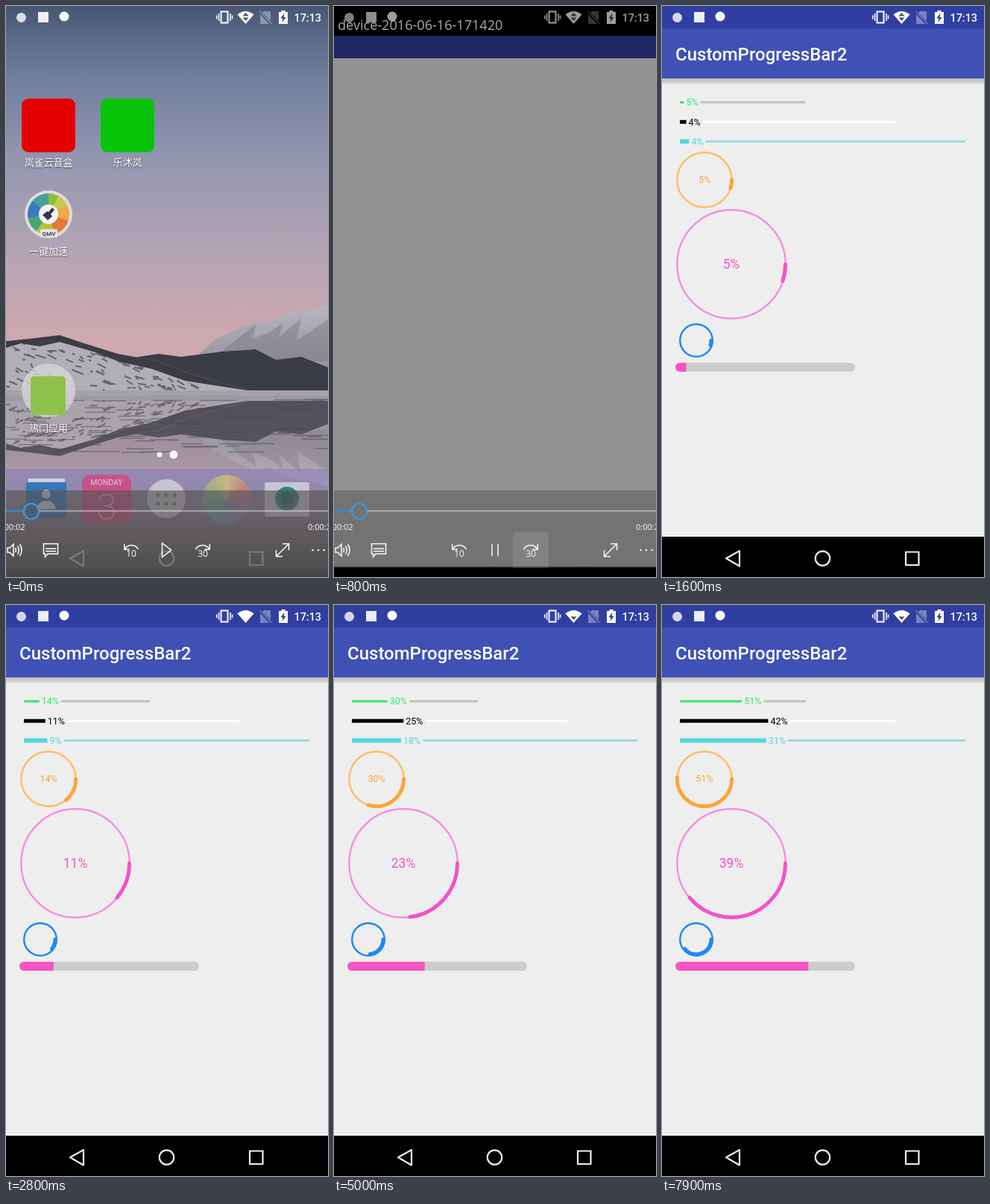
These frames come from a looping animation (432 by 765 pixels, 8000 ms). An HTML page:

```html
<!DOCTYPE html>
<html lang="zh">
<head>
<meta charset="utf-8">
<title>CustomProgressBar2</title>
<style>
html, body { margin: 0; width: 100%; height: 100%; overflow: hidden; background: #000; }
svg { display: block; width: 432px; height: 765px; }
text { font-family: Roboto, sans-serif; }
.label { font: 13px "Noto Sans CJK SC", "Noto Sans CJK", sans-serif; fill: #fff; text-anchor: middle; text-shadow: 0 1px 2px #0009; }
.player text { font-family: "Open Sans", "Noto Sans", sans-serif; fill: #fff; }
.line { fill: none; stroke: #fff; stroke-width: 1.5; }

.fade, .panel, .controls, .play, .pause, .hover, .hover30, #app, #window, #content, #nav, .up, .down {
  animation: 8s step-end infinite;
}
.fade { animation-name: fade; }
.panel { animation-name: panel; }
.controls { animation-name: controls; }
.play { animation-name: play; }
.pause { animation-name: pause; }
.hover { animation-name: hover; }
.hover30 { animation-name: hover30; }
#app { animation-name: app; }
#window { animation-name: slide; }
#content { animation-name: content; }
#nav { animation-name: nav; }
.up { animation-name: up; }
.down { animation-name: down; }

@keyframes fade {
  0% { opacity: 0; animation-timing-function: steps(5); }
  6.25% { opacity: 1; }
  8.75% { opacity: .84; }
  10% { opacity: .67; animation-timing-function: steps(3); }
  13.75% { opacity: .11; }
  15%, 100% { opacity: 0; }
}
@keyframes panel {
  0% { opacity: .62; }
  10% { opacity: .48; animation-timing-function: steps(3); }
  13.75% { opacity: .28; }
  15% { opacity: .1; }
  16.25%, 100% { opacity: 0; }
}
@keyframes controls {
  0% { opacity: 1; }
  10% { opacity: .95; animation-timing-function: steps(3); }
  13.75% { opacity: .3; }
  15% { opacity: .1; }
  16.25%, 100% { opacity: 0; }
}
@keyframes play { 0% { opacity: 1; } 8.75%, 100% { opacity: 0; } }
@keyframes pause { 0% { opacity: 0; } 8.75%, 100% { opacity: 1; } }
@keyframes hover {
  0% { opacity: 0; animation-timing-function: steps(5); }
  6.25% { opacity: 1; }
  8.75%, 100% { opacity: 0; }
}
@keyframes hover30 { 0% { opacity: 0; } 8.75% { opacity: .6; } 12.5%, 100% { opacity: 0; } }
@keyframes app { 0% { opacity: 0; } 10%, 100% { opacity: 1; } }
@keyframes slide {
  0% { transform: translateY(40px); }
  11.25% { transform: translateY(18px); }
  12.5% { transform: translateY(5px); }
  13.75%, 100% { transform: none; }
}
@keyframes content { 0% { opacity: 0; } 15%, 100% { opacity: 1; } }
@keyframes nav {
  0% { opacity: .6; }
  10% { opacity: .2; }
  12.5% { opacity: .5; }
  13.75%, 100% { opacity: .93; }
}
@keyframes up {
  0% { opacity: 1; } 25% { opacity: 0; }
  55% { opacity: 1; } 58.75% { opacity: 0; }
  92.5% { opacity: 1; } 96.25%, 100% { opacity: 0; }
}
@keyframes down {
  0% { opacity: 1; } 25% { opacity: 0; }
  47.5% { opacity: 1; } 70% { opacity: 0; }
  92.5%, 100% { opacity: 1; }
}
.wheel { width: 100%; height: 100%; border-radius: 50%; }
.boost { background: conic-gradient(#8bbf3c 0 8%, #c9c94a 0 18%, #f0a848 0 30%, #e4783c 0 45%, #b8c437 0 60%, #4aa578 0 72%, #3a7cc0 0 86%, #46a098 0); }
.gallery { background: conic-gradient(#d8c07a, #cf7f7a, #a87fae, #6f93c0, #63a9a5, #9db87c, #d8c07a); }
</style>
</head>
<body>
<svg viewBox="0 0 432 765">
<defs>
  <linearGradient id="sky" x2="0" y2="1">
    <stop offset="0" stop-color="#475675"/>
    <stop offset=".16" stop-color="#6d7b9b"/>
    <stop offset=".4" stop-color="#9698b1"/>
    <stop offset=".62" stop-color="#b3a4b3"/>
    <stop offset=".84" stop-color="#cea8af"/>
    <stop offset="1" stop-color="#d3acb0"/>
  </linearGradient>
  <linearGradient id="peak" x2="0" y2="1">
    <stop offset="0" stop-color="#b9b5bf"/>
    <stop offset="1" stop-color="#85838f"/>
  </linearGradient>
  <linearGradient id="lake" x2="0" y2="1">
    <stop offset="0" stop-color="#8f8792"/>
    <stop offset=".4" stop-color="#a998a4"/>
    <stop offset=".52" stop-color="#9a8f9e"/>
    <stop offset=".75" stop-color="#6f6b72"/>
    <stop offset="1" stop-color="#454347"/>
  </linearGradient>
  <linearGradient id="dock" x2="0" y2="1">
    <stop offset="0" stop-color="#8a80c0" stop-opacity=".6"/>
    <stop offset=".3" stop-color="#8a80b0" stop-opacity=".5"/>
    <stop offset="1" stop-color="#555" stop-opacity="0"/>
  </linearGradient>
  <linearGradient id="shade" x2="0" y2="1">
    <stop offset="0" stop-color="#bdbdc0"/>
    <stop offset="1" stop-color="#d9d9d9"/>
  </linearGradient>
  <clipPath id="slope"><path d="M0 455L72 446 120 462 200 484 262 512 300 520H0Z"/></clipPath>
</defs>

<g id="home">
  <rect width="432" height="530" fill="url(#sky)"/>
  <rect y="522" width="432" height="243" fill="url(#lake)"/>
  <g id="hills">
    <path d="M255 470L282 446 315 430 336 422 352 424 388 410 408 408 432 400V522H255Z" fill="url(#peak)"/>
    <path d="M290 462L336 426 330 446 352 438 372 424 366 444 396 418 390 448 432 420V476H290Z" fill="#77757f" opacity=".45"/>
    <path d="M150 474L205 466 235 470 290 463 335 460 362 474 396 470 432 484V518H180Z" fill="#3a3c48"/>
    <path d="M0 449L30 446 72 441 105 452 150 466 205 476 250 494 330 516V522H0Z" fill="#b2aeb5"/>
    <path d="M0 449L30 446 72 441 105 452 150 466 205 476 250 494 330 516 240 502 195 486 150 476 120 464 72 450 45 456 20 452 0 458Z" fill="#3c3b42"/>
    <path id="rocks" clip-path="url(#slope)" fill="none" stroke="#4a484f" stroke-width="2" opacity=".75"/>
    <rect y="515" width="432" height="7" fill="#a5a1ab"/>
  </g>
  <use href="#hills" transform="translate(0 1044) scale(1 -1)" opacity=".72"/>
  <path id="ripples" fill="none" stroke="#4b4852" stroke-width="1.500" opacity=".5"/>

  <rect x="21" y="124" width="72" height="72" rx="9" fill="#e40000"/>
  <rect x="127" y="124" width="72" height="72" rx="9" fill="#08c308"/>
  <text class="label" x="57" y="214">岚雀云音盒</text>
  <text class="label" x="163" y="214">乐沐岚</text>

  <circle cx="57" cy="279" r="32" fill="#dcdde0"/>
  <foreignObject x="29" y="251" width="56" height="56"><div class="wheel boost"></div></foreignObject>
  <circle cx="57" cy="279" r="13" fill="#f4f4f4"/>
  <path d="M62 270L65 273 60 279 62 282 56 287 49 280 55 275 57 276Z" fill="#2d3b50"/>
  <rect x="46" y="299" width="23" height="11" rx="2" fill="#e6e6e6"/>
  <text x="57.500" y="307.500" font-size="8" font-weight="700" text-anchor="middle" fill="#444">QMV</text>
  <text class="label" x="57" y="333">一键加速</text>

  <circle cx="57" cy="515" r="36" fill="#d9d9dc" opacity=".75"/>
  <rect x="33" y="496" width="47" height="52" rx="5" fill="#8fc24c"/>
  <text class="label" x="57" y="570">热门应用</text>
  <circle cx="206" cy="601" r="3.500" fill="#fff" opacity=".85"/>
  <circle cx="225" cy="601" r="5.500" fill="#fff" opacity=".9"/>

  <rect y="620" width="432" height="145" fill="url(#dock)"/>
  <g opacity=".8">
    <rect x="30" y="633" width="49" height="8" fill="#dfe3ea"/>
    <rect x="27" y="638" width="54" height="48" rx="2" fill="#2573bd"/>
    <g fill="#dfe7f2"><circle cx="54" cy="654" r="6"/><path d="M41 674Q43 663 54 663T67 674Z"/></g>
    <rect x="102" y="628" width="66" height="66" rx="11" fill="#d4457f"/>
    <g fill="#f3d8e3" text-anchor="middle">
      <text x="135" y="642" font-size="10.500">MONDAY</text>
      <text x="135" y="688" font-size="48" font-weight="100">3</text>
    </g>
    <circle cx="215" cy="660" r="26" fill="#d3d2dc"/>
    <path d="M204 655H228M204 667H228" stroke="#77757f" stroke-width="5" stroke-linecap="round" stroke-dasharray="0 11"/>
    <foreignObject x="263" y="628" width="66" height="66"><div class="wheel gallery"></div></foreignObject>
    <rect x="347" y="638" width="60" height="46" rx="3" fill="#d5d6e2"/>
    <circle cx="377" cy="660" r="16" fill="#1f8079"/>
    <circle cx="377" cy="660" r="9" fill="#17615f"/>
  </g>
</g>

<g id="app">
  <rect width="432" height="765"/>
  <g id="window">
    <rect width="432" height="711" fill="#eee"/>
    <rect width="432" height="30" fill="#303f9f"/>
  </g>
  <g id="content">
    <rect y="30" width="432" height="67" fill="#3f51b5"/>
    <rect y="97" width="432" height="7" fill="url(#shade)"/>
    <text x="18" y="73" font-size="24" font-weight="500" fill="#fff">CustomProgressBar2</text>
    <g id="bars"></g>
  </g>
</g>

<g id="status" fill="#fff">
  <circle cx="20.500" cy="15.500" r="6.500" opacity=".8"/>
  <rect x="43" y="8" width="14" height="14" opacity=".9"/>
  <circle cx="78" cy="14" r="6.500"/>
  <g class="line">
    <rect x="288.500" y="7.500" width="9" height="15" stroke-width="2"/>
    <path d="M285.500 10V20M301 10V20M282.800 12.500V17.500M303.500 12.500V17.500"/>
  </g>
  <path d="M310.500 11.500Q321.500 2.500 332.500 11.500L321.500 24Z"/>
  <g fill="#555"><path class="up" d="M317.500 13.500L321.500 9 325.500 13.500Z"/><path class="down" d="M317.500 15.500H325.500L321.500 20Z"/></g>
  <path d="M341 11V24H353ZM344 9L346 7H355V20Z" opacity=".35"/>
  <path d="M340.500 7L356.500 24" stroke="#fff" stroke-width="1.300" opacity=".35"/>
  <path d="M369.500 6H374.500V8H378V24H366V8H369.500Z"/>
  <path d="M373.500 9.500L368.500 16.500H371.500L370.500 22 375.500 15H372.500Z" fill="#333c70"/>
  <text x="386.500" y="21" font-size="14.400" font-weight="500">17:13</text>
</g>

<g id="nav" fill="none" stroke="#fff" stroke-width="2.200" stroke-linejoin="round">
  <path d="M86 740L104 730V750.500Z"/>
  <circle cx="215.500" cy="740" r="9.700"/>
  <rect x="327" y="731.500" width="17.500" height="17.500"/>
</g>

<g class="player">
  <g class="fade"><rect width="432" height="753" opacity=".575"/></g>
  <rect class="panel" y="649" width="432" height="104" fill="#545250"/>
  <text class="fade" x="5" y="32" font-size="18.100">device-2016-06-16-171420</text>
  <g class="controls">
    <rect class="hover" x="192" y="705" width="48" height="48" fill="#fff" fill-opacity=".2"/>
    <rect class="hover30" x="240" y="705" width="48" height="48" fill="#fff" fill-opacity=".2"/>
    <path d="M45 676.500H432" stroke="#fff" stroke-width="2" opacity=".45"/>
    <path d="M0 676.500H23" stroke="#2f8fdd" stroke-width="2"/>
    <circle cx="34" cy="677" r="10.200" fill="none" stroke="#3a9be6" stroke-width="2"/>
    <g font-size="11">
      <text x="25.500" y="702" text-anchor="end">0:00:02</text>
      <text x="405" y="702">0:00:28</text>
    </g>
    <g class="line">
      <path d="M2 726H5L10 721V737L5 732H2ZM12.500 726Q14.500 729 12.500 732M15.500 723.500Q19 729 15.500 734.500M18.500 721Q23.500 729 18.500 737"/>
      <path d="M50.500 720.500H69.500V734H56L52.500 738V734H50.500ZM53 727H67M53 730.500H67"/>
      <path d="M159 728A10.500 10.500 0 0 1 177.500 728M158.700 721V728H165.500"/>
      <path d="M254.500 728A10.500 10.500 0 0 1 273 728M273.300 721V728H266.500"/>
      <path d="M363 737L379 721M371 720.500H379.500V729M362.500 729V737.500H371"/>
      <path class="play" d="M209.500 719.500L221.500 729 209.500 738.500Z"/>
      <path class="pause" d="M212 721V737M220 721V737"/>
    </g>
    <g font-size="12" text-anchor="middle">
      <text x="168" y="738">10</text>
      <text x="264" y="738">30</text>
    </g>
    <path d="M411.500 729H428" stroke="#fff" stroke-width="2.600" stroke-linecap="round" stroke-dasharray="0 7.500"/>
  </g>
</g>
</svg>

<script>
const LOOP = 8000;
const root = document.getElementById('bars');

function add(tag, attrs) {
  const node = document.createElementNS('http://www.w3.org/2000/svg', tag);
  for (const key in attrs) node.setAttribute(key, attrs[key]);
  return root.appendChild(node);
}

let seed = 7;
const random = () => (seed = seed * 16807 % 2147483647) / 2147483647;

// Fills a path with short random strokes between two heights.
function scatter(id, count, width, top, bottom, length, drop) {
  let d = '';
  for (let i = 0; i < count; i++) {
    const x = random() * width, y = top + random() * (bottom - top);
    d += `M${x} ${y}l${length * (.3 + random())} ${drop * random()}`;
  }
  document.getElementById(id).setAttribute('d', d);
}
scatter('rocks', 170, 280, 445, 515, 9, 6);
scatter('ripples', 120, 432, 526, 600, 40, 0);

// Whole percent after `start`, one point every `step` ms.
const percent = (t, start, step) => Math.min(100, Math.max(0, Math.floor((t - start) / step)));

function lineBar(y, width, color, rest, weight, start, step) {
  const left = 24, gap = 3;
  const track = add('path', { stroke: rest, 'stroke-width': 3 });
  const done = add('path', { stroke: color, 'stroke-width': weight });
  const label = add('text', { y: y + 4.4, fill: color, 'font-size': 12.5 });
  return t => {
    const n = percent(t, start, step);
    const x = left + width * n / 100;
    label.textContent = n + '%';
    label.setAttribute('x', x);
    const from = x + label.getComputedTextLength() + gap;
    done.setAttribute('d', `M${left} ${y}H${Math.max(left, x - gap)}`);
    track.setAttribute('d', `M${from} ${y}H${left + width}`);
  };
}

function ring(cx, cy, r, arcR, color, rest, size, start, step) {
  add('circle', { cx, cy, r, fill: 'none', stroke: rest, 'stroke-width': 2.4 });
  const arc = add('circle', {
    cx, cy, r: arcR, fill: 'none', stroke: color, 'stroke-width': 5,
    'stroke-linecap': 'round', pathLength: 100
  });
  const label = size && add('text', {
    x: cx, y: cy + size * .355, fill: color, 'font-size': size, 'text-anchor': 'middle'
  });
  return t => {
    const n = percent(t, start, step);
    arc.setAttribute('stroke-dasharray', `${n} 100`);
    if (label) label.textContent = n + '%';
  };
}

function pill(x, y, width, height, start, step) {
  const r = height / 2;
  add('rect', { x, y, width, height, rx: r, fill: '#ccc' });
  const done = add('path', { fill: '#f655c5' });
  return t => {
    const end = x + Math.max(r, width * percent(t, start, step) / 100);
    done.setAttribute('d', `M${end} ${y}H${x + r}a${r} ${r} 0 0 0 0 ${height}H${end}Z`);
  };
}

const parts = [
  lineBar(129, 169, '#2ee86b', '#c0c0c0', 3, 795, 138),
  lineBar(155.3, 289, '#000', '#fff', 5, 836, 165.6),
  lineBar(181.5, 383, '#53d6dc', '#9fd9dd', 6, 680, 230),
  ring(57, 233, 36.7, 36.7, '#fba636', '#fbbf66', 12.5, 795, 138),
  ring(93, 346, 72.7, 72.5, '#f552c8', '#f38ee0', 17.5, 660, 184),
  ring(46, 448, 21.8, 20, '#1e88f5', '#1e88f5', 0, 660, 184),
  pill(18, 478, 241, 12, 1022, 92)
];

let begin;
function draw(now) {
  begin ??= now;
  const t = (now - begin) % LOOP;
  for (const part of parts) part(t);
  requestAnimationFrame(draw);
}
requestAnimationFrame(draw);
</script>
</body>
</html>
```
